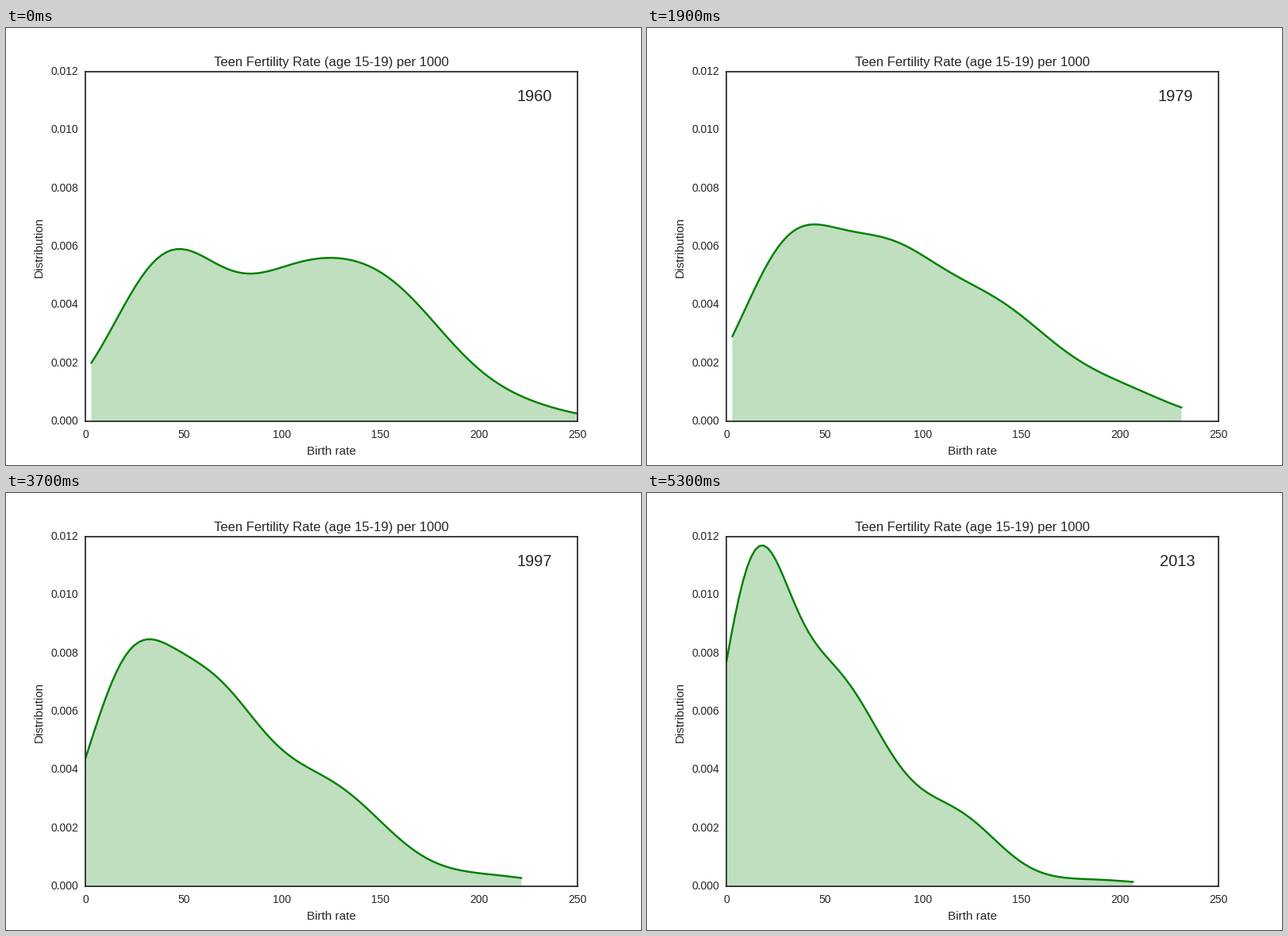
Write a matplotlib script that moves like this. It is 800x550 px and loops after 5400 ms.

```python
import numpy as np
import matplotlib.pyplot as plt
from matplotlib.animation import FuncAnimation

W, H = 800, 550
FIRST, LAST = 1960, 2013
INK = "0.15"
plt.rcParams["font.family"] = "Liberation Sans"

# The density is a sum of four bell curves that drift and reshape over time.
# Each holds its centre, width and height (in 1e-5) at the key years.
KEY_YEARS = [1960, 1979, 1990, 2013]
LOW_GROUP = [42, 32, 23.5, 13], [27.5, 25, 23.7, 16.8], [545, 560, 540, 845]
MIDDLE = [98, 79, 67, 52], [27, 25.5, 24.4, 29], [262, 405, 539, 720]
HIGH_GROUP = [146.5, 131.6, 123, 118], [36.4, 35.5, 35, 22], [472, 395, 388, 207]
TAIL = [225, 203, 215, 185], [25, 25, 25, 25], [30, 75, 37, 22]


def density(x, year):
    total = np.zeros_like(x)
    for group in (LOW_GROUP, MIDDLE, HIGH_GROUP, TAIL):
        centre, width, height = (np.interp(year, KEY_YEARS, track)
                                 for track in group)
        total += height * np.exp(-((x - centre) / width) ** 2 / 2)
    return total * 1e-5


def curve(year):
    """Density between the lowest and highest rate of the year."""
    low = np.interp(year, [1984, 1990], [3, 0])
    high = np.interp(year, [1960, 1966, 1990, 2013], [256, 235, 228, 206.6])
    x = np.linspace(low, high, 100)
    return x, density(x, year)


def label(x, y, text, size, ha="center", **kw):
    """Text with its baseline at stage pixel (x, y)."""
    fig.text(x / W, 1 - y / H, text, size=size, ha=ha, va="baseline",
             color=INK, **kw)


fig = plt.figure(figsize=(W / 100, H / 100), dpi=100, facecolor="white")
ax = fig.add_axes([0.125, 0.1, 0.775, 0.8])
for side in ax.spines.values():
    side.set(color=INK, linewidth=1.25)

for k in range(6):
    label(100 + 124 * k, 516, str(50 * k), 10)
for k in range(7):
    label(91.3, 499 - 440 * k / 6, f"{0.002 * k:.3f}", 10, ha="right")
label(410, 48, "Teen Fertility Rate (age 15-19) per 1000", 12)
label(410, 537, "Birth rate", 11)
label(45.5, 276, "Distribution", 11, rotation=90, rotation_mode="anchor")

area, = ax.fill([0, 0, 0], [0, 0, 0], facecolor="green", alpha=0.25,
                linewidth=0)
line, = ax.plot([], [], color="green", linewidth=1.75,
                solid_capstyle="round")
year_text = ax.text(220, 0.011, "", size=14.4, color=INK, va="baseline")
ax.set(xlim=(0, 250), ylim=(0, 0.012), xticks=[], yticks=[])


def draw(i):
    year = FIRST + i
    x, y = curve(year)
    line.set_data(x, y)
    area.set_xy(np.column_stack([np.r_[x[0], x, x[-1]], np.r_[0, y, 0]]))
    year_text.set_text(str(year))
    # a leading "1" has a wider side bearing
    year_text.set_x(219 if year < 2000 else 220)
    return area, line, year_text


anim = FuncAnimation(fig, draw, frames=LAST - FIRST + 1, interval=100,
                     repeat=True, repeat_delay=0)
plt.show()
```
